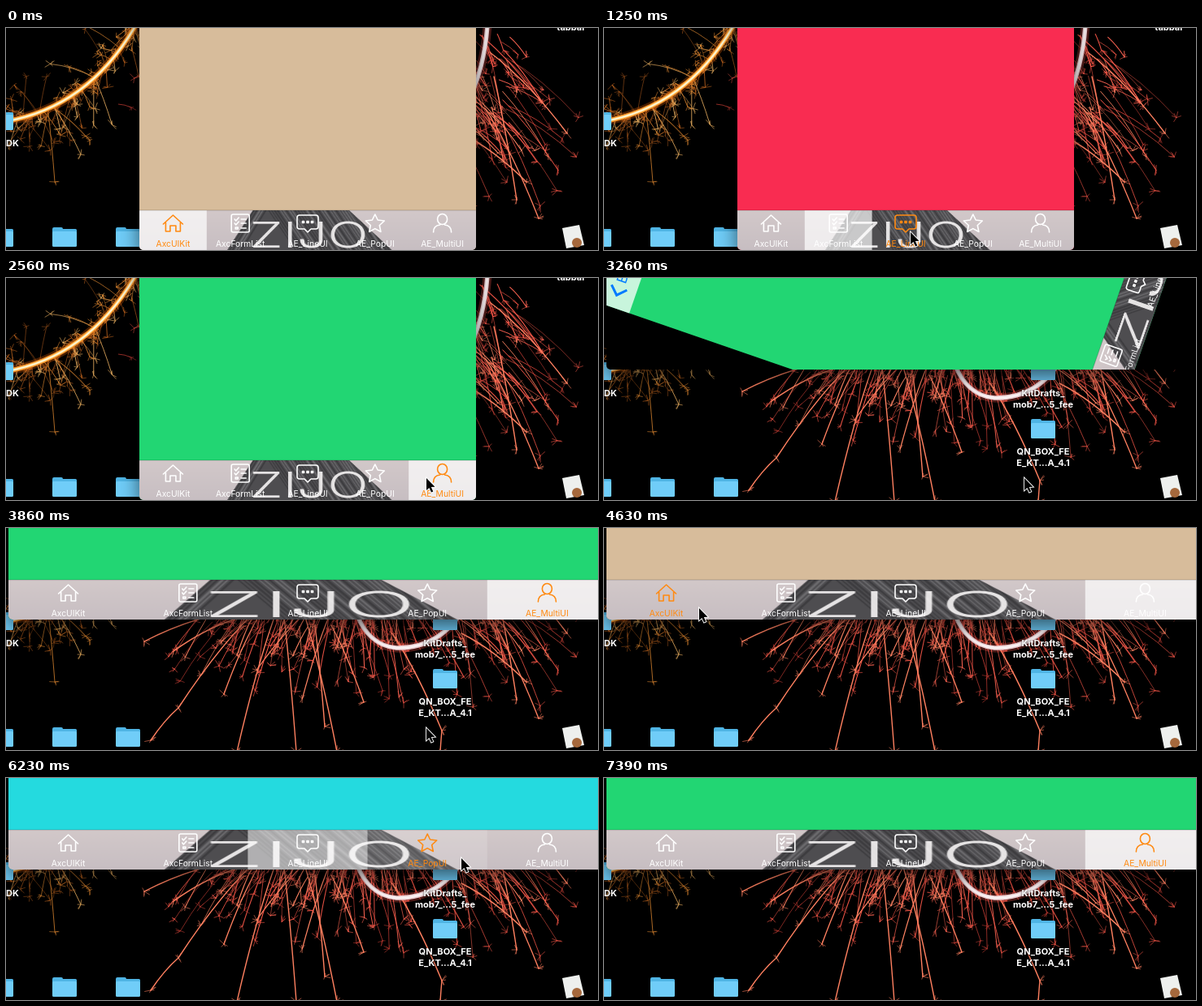
Recreate the animation shown at these times as an HTML page with a canvas. Size 728x274 px, loop 7.49 s.

```html
<!DOCTYPE html>
<html lang="en">
<head>
<meta charset="utf-8">
<title>Tab bar demo</title>
<style>
  html, body { margin: 0; width: 100%; height: 100%; overflow: hidden; background: #000; }
  canvas { display: block; }
</style>
</head>
<body>
<canvas id="stage" width="728" height="274"></canvas>
<script>
const W = 728, H = 274, LOOP = 7490, ROTATE_AT = 3090;
const BAR = 49, SHORT = 414, LONG = 736, CENTER_X = 371;
const FONT = 'Inter, "Open Sans", sans-serif';
const ORANGE = '#ff8a12';
const ctx = document.getElementById('stage').getContext('2d');

const tabs = [
  { label: 'AxcUIKit', page: '#d7bc9b',
    icon: 'M-12 1L0-10L12 1M-9-1V10H-3.5V3H3.5V10H9V-1' },
  { label: 'AxcFormList', page: '#9a7bd0',
    icon: 'M-9-11H9Q11-11 11-9V9Q11 11 9 11H-9Q-11 11-11 9V-9Q-11-11-9-11ZM-7-5L-5.5-3L-2-7M1-5H7M-7 0L-5.5 2L-2-2M1 0H7M-6 5H-3V7H-6ZM1 6H7' },
  { label: 'AE_LineUI', page: '#f92c51',
    icon: 'M-10-10H10Q13-10 13-7V4Q13 7 10 7H4L0 11L-4 7H-10Q-13 7-13 4V-7Q-13-10-10-10ZM-6.5-2.5H-4.5V-.5H-6.5ZM-1-2.5H1V-.5H-1ZM4.5-2.5H6.5V-.5H4.5Z' },
  { label: 'AE_PopUI', page: '#24dadf',
    icon: 'M0-11L3.4-4L11.5-3L5.5 2.5L7.1 10.5L0 6.6L-7.1 10.5L-5.5 2.5L-11.5-3L-3.4-4Z' },
  { label: 'AE_MultiUI', page: '#22d673',
    icon: 'M-6-5A6 6.5 0 1 0 6-5A6 6.5 0 1 0-6-5M-11 11C-11 5-7 2.5-3 2M11 11C11 5 7 2.5 3 2' }
];
for (const tab of tabs) tab.path = new Path2D(tab.icon);

// start, end of the highlight fade, tab
const switches = [
  [-1, 0, 0], [660, 1010, 1], [1250, 1470, 2], [1700, 1980, 3], [2340, 2560, 4],
  [4630, 4980, 0], [5220, 5520, 1], [5700, 5990, 2], [6170, 6460, 3], [6700, 7050, 4]
];
// time, x, y
const pointer = [
  [240, 270, 256], [420, 272, 255], [480, 277, 254], [660, 277, 254], [1010, 360, 254],
  [1250, 377, 252], [1470, 440, 250], [1700, 450, 250], [1980, 517, 247], [3860, 517, 247],
  [4460, 117, 99], [4630, 117, 99], [4980, 245, 100], [5220, 250, 101], [5520, 395, 101],
  [5700, 400, 100], [5990, 520, 99], [6230, 560, 99], [6460, 655, 99], [6800, 660, 99],
  [7100, 700, 280]
];

const clamp01 = v => Math.min(1, Math.max(0, v));
const mix = (a, b, p) => a + (b - a) * p;
const smooth = p => p * p * (3 - 2 * p);
const ramp = (t, a, b) => clamp01((t - a) / (b - a));

function randomizer(seed) {
  return () => (seed = (seed * 16807) % 2147483647) / 2147483647;
}

function text(c, str, x, y, size, color, weight = 400, align = 'center') {
  c.font = `${weight} ${size}px ${FONT}`;
  c.textAlign = align;
  c.fillStyle = color;
  c.fillText(str, x, y);
}

function polygon(c, points) {
  c.beginPath();
  points.forEach(([x, y]) => c.lineTo(x, y));
  c.closePath();
}

function picture(width, height, draw) {
  const canvas = document.createElement('canvas');
  canvas.width = width;
  canvas.height = height;
  draw(canvas.getContext('2d'));
  return canvas;
}

function drawWallpaper(c) {
  const rnd = randomizer(4217);
  const pick = list => list[Math.floor(rnd() * list.length)];
  const reds = ['#ff5a4a', '#e04f42', '#ff8463', '#b93a32', '#f4604f'];
  const golds = ['#d9842f', '#b45f1e', '#f2b564', '#8a4818'];

  function spark(x0, y0, x1, y1, color, width) {
    const bend = Math.hypot(x1 - x0, y1 - y0) * .1;
    c.strokeStyle = color;
    c.lineWidth = width;
    c.beginPath();
    c.moveTo(x0, y0);
    c.quadraticCurveTo((x0 + x1) / 2, (y0 + y1) / 2 - bend, x1, y1);
    c.stroke();
    c.lineWidth = .6;
    c.beginPath();
    for (let i = 0; i < 5; i++) {
      const a = rnd() * 6.28, r = 3 + rnd() * 5;
      c.moveTo(x1, y1);
      c.lineTo(x1 + Math.cos(a) * r, y1 + Math.sin(a) * r);
    }
    c.stroke();
  }
  function ray(x, y, angle, length, color, width) {
    spark(x, y, x + Math.cos(angle) * length, y + Math.sin(angle) * length, color, width);
  }
  function glow(d, layers) {
    const path = new Path2D(d);
    c.lineCap = 'round';
    for (const [width, color] of layers) {
      c.lineWidth = width;
      c.strokeStyle = color;
      c.stroke(path);
    }
  }

  c.fillStyle = '#000';
  c.fillRect(0, 0, W, H);

  for (let i = 0; i < 110; i++) {
    const p = rnd(), q = 1 - p;
    const x = q * q * 160 + 2 * p * q * 100 - 5 * p * p;
    const y = -4 * q * q + 200 * p * q + 116 * p * p;
    const angle = rnd() < .7 ? mix(.7, 2.6, rnd()) : mix(3.4, 5, rnd());
    ray(x, y, angle, 8 + 55 * rnd() ** 2, pick(golds), .4 + rnd() * .5);
  }
  spark(52, 105, 60, 190, golds[0], .8);
  spark(60, 100, 92, 156, golds[2], .8);
  spark(138, 94, 154, 98, reds[3], .8);
  glow('M160-4Q100 100-5 116', [[11, 'rgba(255,110,10,.28)'], [6, '#f08a24'], [3.5, '#ffcf70'], [1.8, '#fff6d8']]);

  for (let i = 0; i < 400; i++) {
    const u = rnd();
    const angle = mix(2.4, .8, u) + (rnd() - .5) * .9;
    ray(250 + u * 375, 5 + rnd() * 120, angle, 20 + 95 * rnd() ** 2, pick(reds), .5 + rnd() * .8);
  }
  const longRays = [
    [320, 90, 212, 222], [212, 222, 178, 262], [300, 100, 170, 140], [290, 110, 206, 152],
    [330, 110, 284, 276], [342, 110, 357, 276], [368, 110, 407, 276], [400, 120, 440, 215],
    [475, 130, 536, 250], [536, 250, 534, 276], [590, 100, 655, 235], [560, 130, 640, 190],
    [595, 30, 690, 130], [600, 60, 628, 212], [380, 120, 392, 245], [310, 110, 268, 205]
  ];
  for (const [x0, y0, x1, y1] of longRays) spark(x0, y0, x1, y1, '#ff8060', 1.4);
  glow('M592-4C588 60 560 150 480 148C455 146 440 128 432 108',
    [[11, 'rgba(255,90,80,.3)'], [5.5, '#e9c9cd'], [3, '#fbf3f4']]);
}

function drawFolder(c, x, y) {
  c.fillStyle = '#4fb4e4';
  c.beginPath();
  c.roundRect(x, y, 13, 8, 2);
  c.roundRect(x, y + 2, 30, 20, 1.5);
  c.fill();
  c.fillStyle = '#70cdf8';
  c.beginPath();
  c.roundRect(x, y + 5, 30, 19, 1.5);
  c.fill();
}

function drawDesktop(c) {
  drawWallpaper(c);
  [[-21, 246], [57, 246], [135, 246], [-21, 102], [525, 102], [525, 174]]
    .forEach(([x, y]) => drawFolder(c, x, y));
  c.shadowColor = '#000';
  c.shadowBlur = 3;
  c.shadowOffsetY = 1;
  const label = (str, x, y) => text(c, str, x, y, 11, '#fff', 700);
  label('DK', 8, 146);
  label('tabbar', 695, 3);
  label('KitDrafts_', 540, 146);
  label('mob7_...5_fee', 540, 160);
  label('QN_BOX_FE', 540, 218);
  label('E_KT...A_4.1', 540, 232);
  c.shadowColor = 'transparent';
  c.fillStyle = '#eef0ee';
  polygon(c, [[684, 247], [705, 243], [711, 268], [689, 272]]);
  c.fill();
  c.fillStyle = '#a5683c';
  c.beginPath();
  c.arc(702, 265, 6, 0, 7);
  c.fill();
}

const PHOTO_W = 276;
function drawPhoto(c) {
  const rnd = randomizer(91);
  c.scale(2, 2);
  const sky = c.createLinearGradient(0, 0, 0, BAR);
  sky.addColorStop(0, '#d2c8c9');
  sky.addColorStop(1, '#c7bec2');
  c.fillStyle = sky;
  c.fillRect(0, 0, PHOTO_W, BAR);
  c.save();
  polygon(c, [[93, 0], [172, 0], [207, BAR], [72, BAR]]);
  c.clip();
  c.fillStyle = '#4e4d50';
  c.fillRect(0, 0, PHOTO_W, BAR);
  for (let i = 0; i < 60; i++) {
    const x = 70 + i * 2.4, lean = x < 105 ? -20 : 22;
    c.strokeStyle = rnd() < .5 ? 'rgba(150,150,152,.4)' : 'rgba(40,40,42,.45)';
    c.lineWidth = .5 + rnd();
    c.beginPath();
    c.moveTo(x, 0);
    c.lineTo(x + lean, BAR);
    c.stroke();
  }
  c.restore();
  text(c, 'ZIJO', 139, 46, 44, 'rgba(250,248,248,.88)', 300);
}

const desktop = picture(W, H, drawDesktop);
const photo = picture(PHOTO_W * 2, BAR * 2, drawPhoto);

function drawTabBar(width, top, selected, previous, fade) {
  const cell = width / tabs.length;
  ctx.drawImage(photo, 0, top, width, BAR);
  const highlight = (index, strength) => {
    ctx.fillStyle = `rgba(255,255,255,${.7 * strength})`;
    ctx.fillRect(index * cell, top, cell, BAR);
  };
  highlight(previous, 1 - fade);
  highlight(selected, fade);
  ctx.fillStyle = 'rgba(0,0,0,.2)';
  ctx.fillRect(0, top - .5, width, 1);
  tabs.forEach((tab, i) => {
    const color = i === selected ? ORANGE : '#fff';
    const x = (i + .5) * cell;
    ctx.save();
    ctx.translate(x, top + 16);
    ctx.strokeStyle = color;
    ctx.lineWidth = 1.6;
    ctx.lineJoin = ctx.lineCap = 'round';
    ctx.stroke(tab.path);
    ctx.restore();
    text(ctx, tab.label, x, top + 45, 10.3, color);
  });
}

function drawNavBar(width, turn) {
  const height = 64 - 30 * turn, y = height - 22;
  ctx.fillStyle = 'rgba(255,255,255,.75)';
  ctx.fillRect(0, 0, width, height);
  ctx.strokeStyle = '#007aff';
  ctx.lineWidth = 3;
  ctx.beginPath();
  ctx.moveTo(26, y - 10);
  ctx.lineTo(16, y);
  ctx.lineTo(26, y + 10);
  ctx.stroke();
  text(ctx, 'Back', 32, y + 6, 17, '#007aff', 400, 'left');
}

function drawWindow(t) {
  const wide = t >= ROTATE_AT;
  const turn = wide ? smooth(ramp(t, 3160, 3500)) : 0;
  const frameW = wide ? LONG : SHORT, frameH = wide ? SHORT : LONG;
  const left = CENTER_X - frameW / 2, bottom = wide ? 113 : H;
  const width = mix(SHORT, LONG, turn), height = mix(LONG, SHORT, turn);

  let index = switches.length - 1;
  while (switches[index][0] > t) index--;
  const [start, end, selected] = switches[index];
  const previous = index ? switches[index - 1][2] : selected;

  ctx.save();
  ctx.beginPath();
  ctx.roundRect(left, bottom - frameH, frameW, frameH, 5);
  ctx.shadowColor = 'rgba(0,0,0,.6)';
  ctx.shadowBlur = 24;
  ctx.shadowOffsetY = 8;
  ctx.fillStyle = '#000';
  ctx.fill();
  ctx.shadowColor = 'transparent';
  ctx.clip();
  ctx.translate(CENTER_X, bottom - frameH / 2);
  if (wide) ctx.rotate((turn - 1) * Math.PI / 2);
  ctx.translate(-width / 2, -height / 2);
  ctx.fillStyle = tabs[selected].page;
  ctx.fillRect(0, 0, width, height);
  drawNavBar(width, turn);
  drawTabBar(width, height - BAR, selected, previous, ramp(t, start, end));
  ctx.restore();
}

function drawPointer(t) {
  if (t < pointer[0][0]) return;
  const next = pointer.findIndex(key => key[0] > t);
  if (next < 0) return;
  const [t0, x0, y0] = pointer[next - 1], [t1, x1, y1] = pointer[next];
  const p = smooth(ramp(t, t0, t1));
  ctx.save();
  ctx.translate(mix(x0, x1, p), mix(y0, y1, p));
  polygon(ctx, [[0, 0], [0, 15], [3.4, 12], [6, 17.5], [8.3, 16.5], [5.8, 11], [10.5, 10.8]]);
  ctx.lineWidth = 1.8;
  ctx.strokeStyle = '#fff';
  ctx.stroke();
  ctx.fillStyle = '#000';
  ctx.fill();
  ctx.restore();
}

const startTime = performance.now();
function frame() {
  const t = (performance.now() - startTime) % LOOP;
  ctx.drawImage(desktop, 0, 0);
  drawWindow(t);
  drawPointer(t);
  requestAnimationFrame(frame);
}
frame();
</script>
</body>
</html>
```
